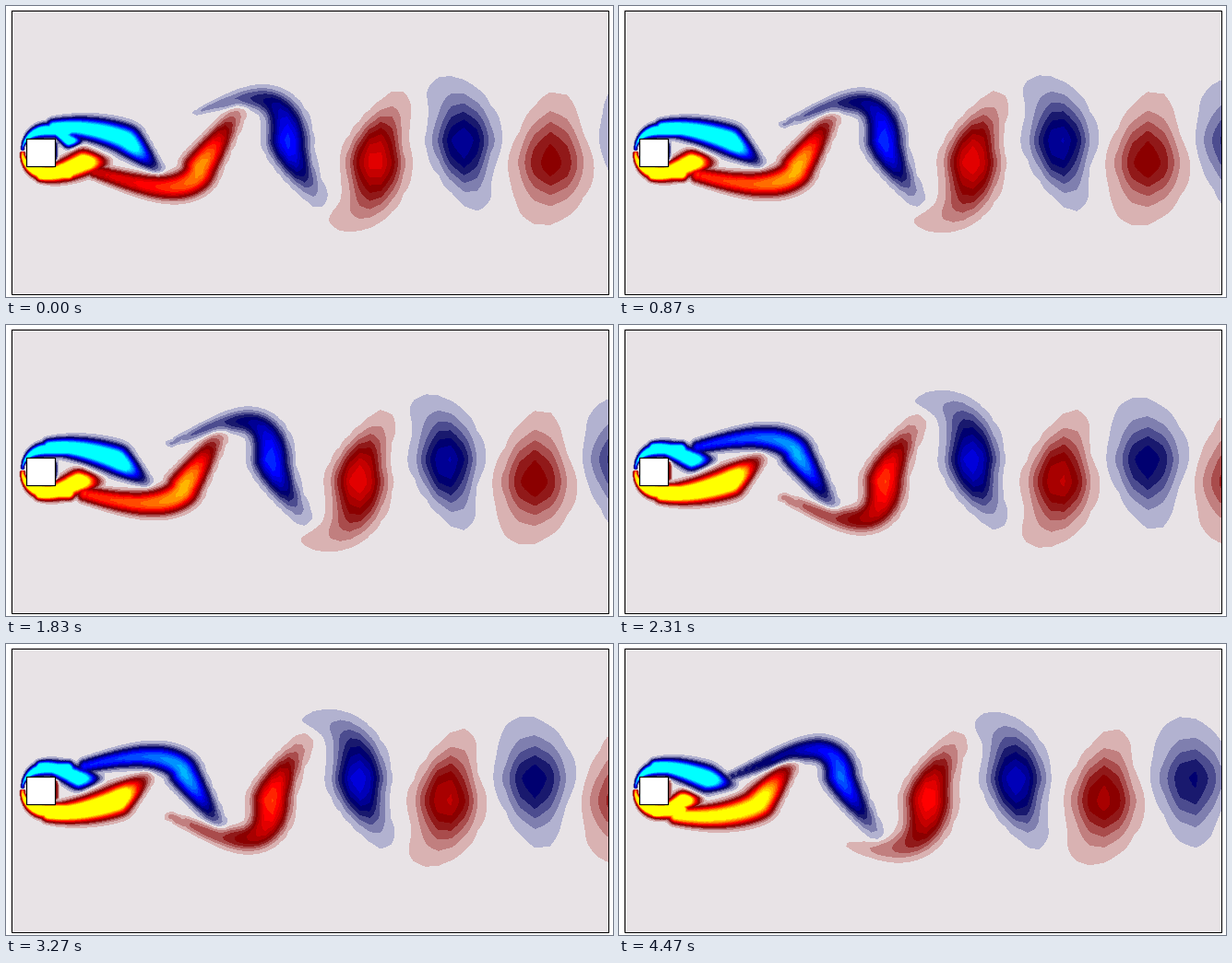
A matplotlib script for the animation above (4500 ms loop, 658x316 px).

```python
import numpy as np
import matplotlib.pyplot as plt
from matplotlib.animation import FuncAnimation
from matplotlib.patches import Rectangle

W, H, DPI = 658, 316, 100
FRAMES, INTERVAL = 150, 30
PERIOD = 32          # frames per shedding cycle
MID = 158            # centre line of the wake
BIRTH = -16          # age at which a vortex starts to roll up
SPEED = 5.95         # drift of a shed vortex, px per frame
EDGE = 0.5           # vorticity on the outermost contour
FALLOFF = 2.5        # above 2: flat core with a steep rim
BACK = (232 / 255, 227 / 255, 230 / 255)


def stretched(start, end, step, flat, growth):
    """Nodes with even spacing up to `flat`, then widening cells."""
    nodes = [start]
    while nodes[-1] < end:
        nodes.append(nodes[-1] + step + growth * max(0, nodes[-1] - flat))
    nodes[-1] = end
    return np.array(nodes)


half = stretched(0, 154, 1.4, 42, 0.07)
xs = stretched(5.5, 652.5, 1.4, 60, 0.03)
ys = MID + np.concatenate([-half[:0:-1], half])
X, Y = np.meshgrid(xs, ys)


def bump(t, centre, width):
    return np.exp(-((t - centre) / width) ** 2)


def smoothstep(t):
    t = np.clip(t, 0, 1)
    return t * t * (3 - 2 * t)


def stroke(x, y, amp, radius):
    """Log vorticity of a path; `radius` is where it falls to EDGE."""
    x, y, amp, radius = (np.asarray(v)[:, None, None] for v in (x, y, amp, radius))
    drop = np.maximum(np.log(amp / EDGE), 0.5)
    dist = ((X - x) ** 2 + (Y - y) ** 2) / radius ** 2
    return (np.log(amp) - drop * dist ** (FALLOFF / 2)).max(axis=0)


def vortex(age):
    """Lower vortex: a core, an arm up to the tip and a trailing tail."""
    # the core speeds up while it forms, then drifts evenly
    grow = min(age - BIRTH, 48)
    core_x = 68 + 0.0617 * grow ** 2 + SPEED * max(age - 32, 0)
    core_y = 170 + 6 * bump(age, 30, 8)
    core_amp = min(22, 20 * np.exp(-age / 70) + 8 * bump(age, 0, 20))
    core_r = np.interp(age, [BIRTH, 10, 40, 64, 96], [12, 23, 24, 38, 45])

    # arm: leans forward most at the moment of shedding
    q = np.linspace(1, 0, 16)
    lean = max(42 - 0.55 * abs(age - 32), 0)
    arm_x = lean * q ** (1 + max(age - 32, 0) / 40)
    arm_y = -63 * smoothstep((age + 2) / 36) * q
    arm_amp = np.exp(-2.2 * q ** 2)
    arm_r = 1 - 0.6 * q

    # tail: stretches back to the block, then curls under the core
    q = np.linspace(0, 1, 31)[1:]
    length = np.interp(age, [BIRTH, 0, 34, 44, 64, 96], [24, 45, 118, 112, 54, 20])
    depth = np.interp(age, [10, 30, 60, 96], [13, 18, 64, 45])
    curl = 0.5 + 0.5 * bump(age, 37, 14)
    tail_x = -length * q ** np.interp(age, [11, 43], [1, 2.2])
    tail_y = depth * np.sin(np.pi * curl * q)
    tail_amp = np.exp(-np.interp(age, [24, 64], [0, 3]) * q ** 1.3)
    tail_r = 1 - np.interp(age, [25, 50, 96], [0.45, 0.9, 0.6]) * q ** 1.3

    return stroke(core_x + np.r_[arm_x, tail_x], core_y + np.r_[arm_y, tail_y],
                  core_amp * np.r_[arm_amp, tail_amp],
                  core_r * np.r_[arm_r, tail_r])


def sheath():
    """Steady shear layer around the lower front corner of the block."""
    turn = np.r_[np.linspace(0, np.pi / 2, 20), np.full(8, np.pi / 2)]
    along = np.r_[np.zeros(20), np.linspace(3, 22, 8)]
    s = np.sin(turn)
    return stroke(45 - 27 * np.cos(turn) + along, 160 + 21 * s,
                  14 + 8 * s, 3 + 9 * s ** 2)


STEADY = sheath()


def lower_field(phase):
    log_field = STEADY
    for age in range(phase - PERIOD, 128, PERIOD):
        if age >= BIRTH:
            log_field = np.maximum(log_field, vortex(age))
    # thin layer rolled up on the rear face
    swing = 6 * np.cos(2 * np.pi * (phase - PERIOD / 2) / PERIOD)
    if swing > EDGE:
        y = np.linspace(150, 166, 9)
        ones = np.ones_like(y)
        log_field = np.maximum(log_field, stroke(54 * ones, y, swing * ones, 3.5 * ones))
    return np.exp(log_field)


def shade(k):
    """Fill colour of band k: blue to cyan below zero, red to yellow above."""
    if k == 0:
        return BACK
    n = abs(k)
    pale = np.interp(n, [1, 4.5], [178, 0])
    glow = np.interp(n, [9, 16], [0, 255])
    if k > 0:
        main = np.interp(n, [1, 4, 5, 9], [217, 145, 139, 255])
        rgb = main, pale + glow, pale
    else:
        main = np.interp(n, [1, 4, 5, 9], [208, 110, 112, 255])
        rgb = pale, pale + glow, main
    return tuple(v / 255 for v in rgb)


fig = plt.figure(figsize=(W / DPI, H / DPI), dpi=DPI, facecolor="white")
ax = fig.add_axes([0, 0, 1, 1])
ax.axis("off")

line = 72 / DPI
ax.add_patch(Rectangle((5.5, 4.5), 647, 308, fc=BACK, ec="none", zorder=0))

levels = np.arange(-15.5, 16)
colors = [shade(k) for k in range(-16, 17)]
lower = [lower_field(p) for p in range(PERIOD)]
flows = []
for p in range(PERIOD):
    # the upper layer mirrors the lower one half a cycle later
    upper = lower[(p + PERIOD // 2) % PERIOD][::-1]
    flow = ax.contourf(xs, ys, lower[p] - upper, levels=levels,
                       colors=colors, extend="both", zorder=1)
    flow.set_visible(False)
    flows.append(flow)

ax.add_patch(Rectangle((21.5, 143.5), 31, 30, fc="white", ec="black",
                       lw=1.2 * line, zorder=3))
ax.add_patch(Rectangle((5.5, 4.5), 647, 308, fc="none", ec="black",
                       lw=line, zorder=4))
ax.set(xlim=(0, W), ylim=(H, 0))


def update(frame):
    for p, flow in enumerate(flows):
        flow.set_visible(p == frame % PERIOD)
    return flows


anim = FuncAnimation(fig, update, frames=FRAMES, interval=INTERVAL,
                     repeat=True, repeat_delay=0, blit=False)
plt.show()
```
